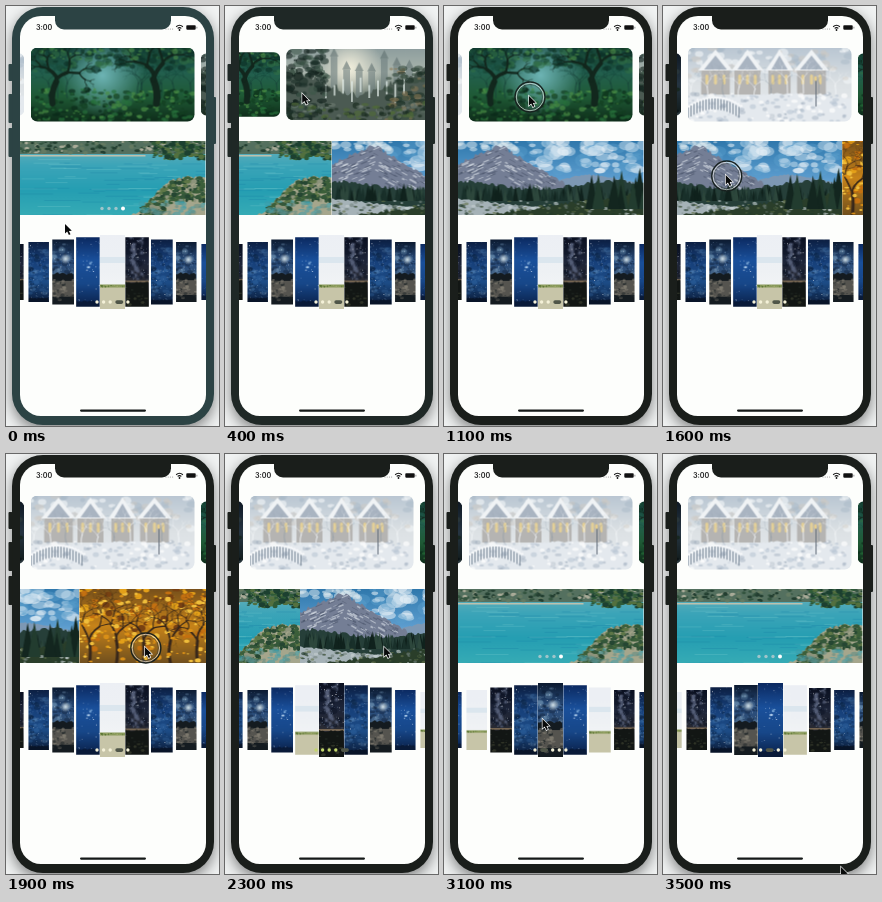
An HTML page with a canvas for the animation above (3600 ms loop, 213 by 420 pixels).

```html
<!DOCTYPE html>
<html lang="en">
<head>
<meta charset="utf-8">
<title>Carousel demo</title>
<style>
html, body { margin: 0; width: 100%; height: 100%; overflow: hidden; background: #eee; }
canvas { display: block; width: 100vw; height: 100vh; }
</style>
</head>
<body>
<canvas id="stage" width="213" height="420"></canvas>
<script>
const LOOP = 3600, STEP = 100, SLIDE = 400, RELEASE = .45, TRAVEL = 300;
const g = document.getElementById('stage').getContext('2d');
let seed = 1;
const rnd = () => (seed = seed * 16807 % 2147483647) / 2147483647;
const between = (a, b) => a + (b - a) * rnd();
const mod = (a, n) => ((a % n) + n) % n;
const clamp = p => Math.max(0, Math.min(1, p));
const ease = p => (p = clamp(p), p * p * (3 - 2 * p));

// ---- drawing helpers
function rect(c, color, x, y, w, h, r = 0) {
  c.fillStyle = color;
  c.beginPath();
  c.roundRect(x, y, w, h, r);
  c.fill();
}
function blob(c, color, x, y, rx, ry = rx) {
  c.fillStyle = color;
  c.beginPath();
  c.ellipse(x, y, rx, ry, 0, 0, 7);
  c.fill();
}
function ring(color, width, x, y, r, from = 0, to = 7) {
  g.strokeStyle = color;
  g.lineWidth = width;
  g.beginPath();
  g.arc(x, y, r, from, to);
  g.stroke();
}
function triangle(c, color, x, base, half, tall) {
  c.fillStyle = color;
  c.beginPath();
  c.moveTo(x - half, base);
  c.lineTo(x, base - tall);
  c.lineTo(x + half, base);
  c.fill();
}
function sky(c, w, h, ...colors) {
  const f = c.createLinearGradient(0, 0, 0, h);
  colors.forEach((k, i) => f.addColorStop(i / (colors.length - 1), k));
  rect(c, f, 0, 0, w, h);
}
function glow(c, color, x, y, r) {
  const f = c.createRadialGradient(x, y, 0, x, y, r);
  f.addColorStop(0, color);
  f.addColorStop(1, color + '00');
  rect(c, f, x - r, y - r, 2 * r, 2 * r);
}
// fills everything below the line top(x), slightly roughened
function ridge(c, color, w, h, top, rough = 1) {
  c.fillStyle = color;
  c.beginPath();
  c.moveTo(0, h);
  for (let x = 0; x <= w; x += 2) c.lineTo(x, top(x) + between(-rough, rough));
  c.lineTo(w, h);
  c.fill();
}
function scatter(c, n, x, y, w, h, size, ...colors) {
  for (let i = 0; i < n; i++) {
    const r = size * between(.3, 1);
    blob(c, colors[i % colors.length], x + w * rnd(), y + h * rnd(), r, r * between(.4, .9));
  }
}
function pines(c, n, x, w, base, tall, ...colors) {
  for (let i = 0; i < n; i++) {
    const h = tall * between(.4, 1);
    triangle(c, colors[i % colors.length], x + w * rnd(), base, h * .18, h);
  }
}
function tree(c, color, x, y, len, angle = -Math.PI / 2, width = len / 4) {
  if (len < 3) return;
  const ex = x + len * Math.cos(angle), ey = y + len * Math.sin(angle);
  c.strokeStyle = color;
  c.lineWidth = width;
  c.lineCap = 'round';
  c.beginPath();
  c.moveTo(x, y);
  c.quadraticCurveTo(x + between(-3, 3), (y + ey) / 2, ex, ey);
  c.stroke();
  for (const side of [-1, 1]) tree(c, color, ex, ey, len * between(.6, .8), angle + side * between(.3, .8), width * .6);
}
function scene(w, h, draw) {
  const pic = document.createElement('canvas');
  pic.width = w;
  pic.height = h;
  seed = 77 + w * 3;
  draw(pic.getContext('2d'), w, h);
  return pic;
}

// ---- wide cards
function village(c, w, h) {
  sky(c, w, h, '#b9c6d2', '#dde2e5', '#e6eaee');
  scatter(c, 90, 0, 0, w, 34, 6, '#a3b3c466', '#f4f6f899', '#cfc9be66');
  for (let x = 28; x < 140; x += 32) {
    const s = between(11, 15);
    rect(c, '#b5b4b2', x - s, 21, s * 2, 26);
    triangle(c, '#f0f3f5', x, 23, s + 3, 21);
    triangle(c, '#a9b4c1', x, 22, s - 3, 14);
    for (let i = -1; i < 2; i++) rect(c, '#e3cf97', x + i * s * .6 - 1.5, 27, 3, 10, 1.5);
  }
  for (let x = 4; x < w; x += 16) tree(c, x % 3 ? '#f3f6f8bb' : '#8795a377', x, between(44, 54), 12, -1.6, 1.2);
  ridge(c, '#e4e9ee', w, h, x => 48 + 2 * Math.sin(x / 20));
  scatter(c, 130, 0, 46, w, 28, 3.5, '#ffffffaa', '#b4c2d188', '#94a3b466');
  for (let x = 0; x < 52; x += 3) {
    const y = 50 + (x - 26) ** 2 / 75;
    rect(c, '#7f8d9c', x, y, 1, 12);
    rect(c, '#f6f8fa', x, y - 1, 4, 2);
  }
  rect(c, '#626c78', 128, 31, 1, 28);
  blob(c, '#e8cf8c', 128, 31, 1.5, 2.5);
}
function forest(c, w, h) {
  sky(c, w, h, '#123c33', '#23604f', '#1f5a35', '#0e2c1a');
  glow(c, '#6db4b4', 72, 28, 42);
  scatter(c, 150, 0, 0, w, 24, 5, '#0e3328aa', '#33704388', '#1a4b3999');
  for (let i = 0; i < 10; i++) tree(c, '#17403888', w * rnd(), 50, 14, -1.57, 1.5);
  scatter(c, 260, 0, 42, w, 32, 3.5, '#27703aaa', '#123d20aa', '#4b8f45aa', '#0a2a19aa');
  tree(c, '#12271d', 126, 56, 24, -1.7, 7);
  tree(c, '#12271d', 22, 56, 22, -1.4, 6);
  scatter(c, 70, 0, 0, w, 12, 3, '#4e904a99', '#10362599');
}
function castle(c, w, h) {
  sky(c, w, h, '#8e9e9e', '#aab5ad', '#5b6c62', '#27372d');
  glow(c, '#f1eedc', 66, 20, 34);
  for (let x = 46; x < 125; x += 13) {
    const top = between(8, 24);
    rect(c, '#6f7f7f99', x, top, 7, 40);
    triangle(c, '#5f706f99', x + 3.5, top, 4.5, 9);
  }
  ridge(c, '#4b5a52', w, h, x => 50 - Math.abs(x - 75) * .42, 4);
  for (let x = 40; x < 130; x += 9) rect(c, '#e4eeeaaa', x, between(26, 42), 2, between(10, 24));
  scatter(c, 120, 0, 0, 42, h, 6, '#1b2f2899', '#40594b99', '#13221c99');
  scatter(c, 120, 105, 20, 59, 54, 5, '#34493c99', '#8c785288', '#1b2e2499');
  scatter(c, 110, 0, 56, w, 18, 4, '#1a2b20aa', '#506b3799', '#7f8d8366');
}
function dusk(c, w, h) {
  sky(c, w, h, '#101a25', '#263542', '#111b1a');
  scatter(c, 80, 0, 20, w, 54, 6, '#172721', '#28353a', '#0b1316');
}

// ---- full-width banners
function mountain(c, w, h) {
  sky(c, w, h, '#2f78ac', '#5b9cce', '#c3dbe8');
  scatter(c, 90, 60, 0, 126, 30, 9, '#f0f5f988', '#c7deec88', '#5d9fcd66');
  scatter(c, 25, 0, 0, 60, 10, 6, '#dbe8ef88');
  ridge(c, '#7d98b4', w, h, x => 38 - 4 * Math.sin(x / 17));
  const peak = x => 4 + Math.abs(x - 42) * (x < 42 ? .45 : .6);
  ridge(c, '#747e95', w, h, peak, 2);
  for (let i = 0; i < 170; i++) {
    const x = between(0, 100), y = peak(x) + between(1, 30);
    c.save();
    c.translate(x, y);
    c.rotate(x < 42 ? -.4 : .5);
    rect(c, i % 2 ? '#d3dae399' : '#454f6577', 0, 0, between(2, 8), between(.6, 1.8));
    c.restore();
  }
  ridge(c, '#263f39', w, h, x => 44 - 4 * Math.cos(x / 25), 2);
  pines(c, 110, 0, w, 60, 18, '#19302a', '#2d473c', '#10221d');
  ridge(c, '#a5b2b7', w, h, x => 58 + x * .1);
  ridge(c, '#2a3e2a', w, h, x => 78 - x * .14, 2);
  scatter(c, 160, 0, 60, w, 14, 2.5, '#75847f99', '#c5cfd099', '#233a2baa', '#62724a99');
  pines(c, 14, 130, 56, 68, 46, '#13261f', '#223c2f');
}
function autumn(c, w, h) {
  sky(c, w, h, '#77501b', '#c78319', '#71501e');
  scatter(c, 260, 0, 0, w, 60, 4, '#e3a019', '#c37011', '#efbd3b', '#784112');
  for (let x = 10; x < w; x += 27) tree(c, '#39281a', x, h, 22, -1.57, 3);
  scatter(c, 150, 0, 0, w, h, 3, '#d98f17', '#efbd3b');
}
function lake(c, w, h) {
  sky(c, w, h, '#729bb5', '#c4d4d4', '#416858', '#203d32');
  pines(c, 60, 0, w, 62, 25, '#25483b', '#18352c');
}
function lagoon(c, w, h) {
  sky(c, w, h, '#6fb4bb', '#3ba4b8', '#259eb2', '#36abb5');
  for (let i = 0; i < 70; i++) rect(c, i % 2 ? '#7accce44' : '#1479a044', w * rnd(), between(18, h), between(10, 38), 1);
  rect(c, '#54705f', 0, 0, w, 13);
  scatter(c, 150, 0, 0, w, 12, 3, '#345540', '#233f31', '#647a62', '#a9ab98');
  rect(c, '#bcc1ae', 0, 14, 126, 1.5);
  scatter(c, 110, 134, 0, 52, 18, 3.5, '#2f5b38', '#1c4030', '#53703f');
  const shore = x => 74 - 46 * ease((x - 95) / 70);
  ridge(c, '#a5a68c', w, h, x => shore(x) + 8, 2);
  for (let i = 0; i < 320; i++) {
    const x = between(104, w), y = shore(x) + between(9, 32);
    blob(c, ['#3c5f3a', '#254632', '#5d7647', '#8d947c', '#34573a'][i % 5], x, y, between(1, 3.5), between(1, 2.5));
  }
  scatter(c, 50, 120, 60, 66, 14, 4, '#3c9daa88', '#5c8a8488');
}

// ---- narrow strips
function stars(c, n, w, h) {
  for (let i = 0; i < n; i++) rect(c, i % 3 ? '#b9d6f877' : '#ffffffcc', w * rnd(), h * rnd(), between(.4, 1), between(.4, 1));
}
function blueNight(c, w, h) {
  sky(c, w, h, '#0c1f42', '#17407a', '#1d4c86', '#0a1a36');
  scatter(c, 70, 0, 8, w, 56, 4, '#3f77b444', '#0b244677', '#78a4cc33');
  stars(c, 80, w, h);
  ridge(c, '#081428', w, h, () => 69);
}
function moonNight(c, w, h) {
  sky(c, w, h, '#0c1a30', '#2a4f80', '#314a66', '#1c1e20');
  scatter(c, 50, 0, 4, w, 36, 4, '#7fa6c344', '#0f203a77');
  glow(c, '#d3e2e8', 15, 22, 6);
  stars(c, 30, w, 36);
  ridge(c, '#141b20', w, h, () => 39, 2);
  rect(c, '#55544f', 0, 47, w, 18);
  scatter(c, 50, 0, 46, w, 24, 2.5, '#8a867888', '#23292b99');
}
function cloudNight(c, w, h) {
  sky(c, w, h, '#0c2a61', '#1a509b', '#174789', '#0a2048');
  stars(c, 35, w, h);
  scatter(c, 12, 11, 26, 10, 11, 2, '#e2efffbb', '#8ebae3aa');
  ridge(c, '#091a38', w, h, () => 68);
}
function field(c, w, h) {
  sky(c, w, h, '#eceff4', '#eef1f4', '#f7f8f8');
  rect(c, '#dbe6ee', 0, 22, w, 6);
  rect(c, '#c7c5a8', 0, 50, w, 24);
  rect(c, '#88995a', 0, 49.5, w, 3);
  scatter(c, 25, 0, 50, w, 2, 1, '#5a7535', '#a3ab72');
}
function milkyWay(c, w, h) {
  sky(c, w, h, '#0b1020', '#1c2438', '#2b2c33', '#101113');
  for (let i = 0; i < 30; i++) glow(c, '#58627c', between(6, 18), i * 1.5, 3);
  scatter(c, 30, 0, 0, w, 44, 4, '#0d142688');
  stars(c, 60, w, 46);
  rect(c, '#756552', 0, 46, w, 2);
  ridge(c, '#121614', w, h, () => 48);
  scatter(c, 25, 0, 53, w, 20, 2.5, '#303428', '#1b211d');
}

const build = (w, scenes) => scenes.map(draw => scene(w, 74, draw));
const carousels = [
  { pics: build(164, [village, forest, castle, dusk]), start: 1, y: 78.5, gap: 157, shrink: .16, reach: 1, radius: 7 },
  { pics: build(186, [mountain, autumn, lake, lagoon]), start: -1, y: 172, gap: 186, shrink: 0, reach: 1, radius: 0 },
  { pics: build(25, [blueNight, moonNight, cloudNight, field, milkyWay]), start: 3, y: 266, gap: 24.6, shrink: .06, reach: 5, radius: 0 }
];

// ---- motion: slides move a carousel by whole pages, swipes also lead the pointer
const slide = (time, id, pages) => ({ time, id, pages });
const swipe = (time, id, pages, x, y) => ({ time, id, pages, x, y });
const swipes = [
  swipe(-SLIDE * RELEASE, 0, 0, 59, 218),
  swipe(120, 0, 1, 150, 88),
  swipe(523, 0, -1, 69, 87),
  swipe(1100, 0, -1, 85, 90),
  swipe(1518, 1, 1, 83, 169),
  swipe(1750, 1, -1, 80, 193),
  swipe(2704, 2, 1, 94, 265),
  swipe(3150, 2, 1, 100, 265),
  swipe(3500, 0, 0, 178, 413)
];
const moves = [...swipes, slide(200, 1, 1), slide(1900, 2, 1), slide(2146, 1, -1), slide(2300, 2, 1)];

const progress = (m, t) => (t - m.time) / SLIDE;
const position = (id, t) => moves.filter(m => m.id === id)
  .reduce((sum, m) => sum + m.pages * ease(progress(m, t)), carousels[id].start);
const dragX = (s, t) => s.x - s.pages * carousels[s.id].gap * ease(Math.min(progress(s, t), RELEASE));

function pointerAt(t) {
  const i = swipes.findLastIndex(s => s.time <= t), now = swipes[i], next = swipes[i + 1];
  const x = dragX(now, t), y = now.y;
  if (!next) return { x, y };
  const leave = Math.max(now.time + SLIDE * RELEASE, next.time - TRAVEL);
  const p = ease((t - leave) / (next.time - leave));
  const down = now.pages && progress(now, t) < RELEASE;
  return { x: x + (next.x - x) * p, y: y + (next.y - y) * p, down };
}

// ---- screen parts
function drawCarousel({ pics, y, gap, shrink, reach, radius }, pos) {
  const mid = Math.round(pos);
  for (let i = mid - reach; i <= mid + reach; i++) {
    const pic = pics[mod(i, pics.length)], d = i - pos;
    const s = 1 - shrink * Math.min(Math.abs(d), reach), w = pic.width * s, h = pic.height * s;
    g.save();
    g.translate(106.5 + d * gap - w / 2, y - h / 2);
    g.beginPath();
    g.roundRect(0, 0, w, h, radius * s);
    g.clip();
    g.drawImage(pic, 0, 0, w, h);
    g.restore();
  }
}
function bannerDots(pos) {
  if (Math.abs(pos + 1) > .3) return;
  for (let i = 0; i < 4; i++) blob(g, i === 3 ? '#fff' : '#e9d9d999', 96 + i * 7, 202.5, i === 3 ? 2 : 1.7);
}
function stripDots(page) {
  for (let i = 0; i < 5; i++) {
    const x = 91 + 6.6 * i + (i > page ? 4.5 : 0);
    if (i === page) rect(g, '#4f5548', x - 1.5, 294.3, 8, 3.6, 1.8);
    else blob(g, page === 4 ? '#c3d66c' : '#f4f1d8', x, 296, 1.7);
  }
}
function statusBar() {
  g.fillStyle = '#222';
  g.font = '600 7.2px Inter, sans-serif';
  g.fillText('3:00', 30, 24.3);
  for (let i = 0; i < 4; i++) blob(g, '#999', 160 + i * 2.2, 23, .6);
  g.lineCap = 'butt';
  for (const r of [2.8, 5]) ring('#111', 1.1, 173.5, 24.5, r, -2.3, -.84);
  blob(g, '#111', 173.5, 24, .9);
  rect(g, '#888', 180, 19, 10, 5, 1.4);
  rect(g, '#111', 180.6, 19.6, 8.8, 3.8, .9);
  rect(g, '#777', 190.5, 20.7, .8, 1.7);
}
function drawPointer({ x, y, down }) {
  if (down) {
    ring('#18211f', 1.4, x + 1, y + 1, 15);
    ring('#eeeeeeaa', 1, x + 1, y + 1, 13.7);
    ring('#35403d99', .8, x + 1, y + 1, 12.5);
  }
  const arrow = new Path2D(`M${x} ${y}v9.5l2.2-2 1.7 3.5 1.6-.8-1.6-3.3 2.9-.1z`);
  g.lineWidth = 1.3;
  g.strokeStyle = '#fff';
  g.stroke(arrow);
  g.fillStyle = '#080a0a';
  g.fill(arrow);
}
function phone(t) {
  const k = ease(t / 600);
  const body = `rgb(${44 - 18 * k},${67 - 37 * k},${68 - 41 * k})`;
  rect(g, '#f0f2f2', 0, 0, 213, 420);
  g.save();
  g.shadowColor = '#0007';
  g.shadowBlur = 14;
  g.shadowOffsetY = 5;
  rect(g, body, 6, 1, 202, 418, 31);
  g.restore();
  for (const [y, h] of [[58, 17], [88, 29], [122, 29]]) rect(g, body, 2.5, y, 4, h, 1);
  rect(g, body, 207, 91, 3, 47, 1);
  rect(g, '#fdfefc', 14, 10, 186, 400, 21);
  rect(g, body, 49, 9, 116, 14.5, [0, 0, 9, 9]);
}

function draw(t) {
  const pos = carousels.map((_, id) => position(id, t));
  phone(t);
  statusBar();
  g.save();
  g.beginPath();
  g.rect(14, 26, 186, 376);
  g.clip();
  carousels.forEach((c, id) => drawCarousel(c, pos[id]));
  bannerDots(pos[1]);
  stripDots(mod(Math.round(pos[2]), 5));
  g.restore();
  rect(g, '#151918', 74, 403.5, 66, 2.2, 1.1);
  drawPointer(pointerAt(t));
}

function frame() {
  draw(Math.floor(performance.now() % LOOP / STEP) * STEP);
  requestAnimationFrame(frame);
}
frame();
</script>
</body>
</html>
```
